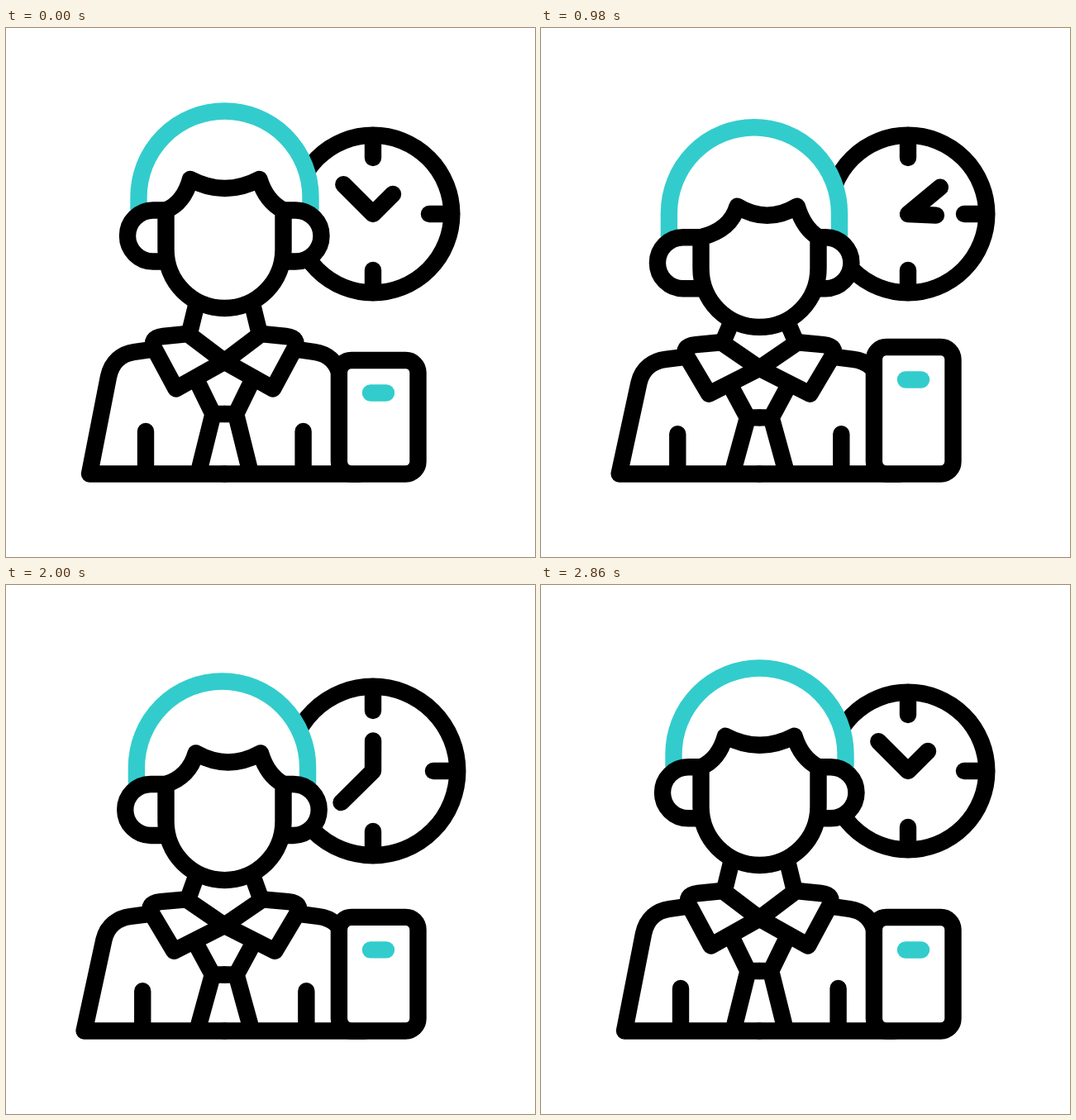
These frames come from a looping animation (640x640 px, 3160 ms). An HTML page with a canvas:

```html
<!DOCTYPE html>
<html>
<head>
<meta charset="utf-8">
<style>
html, body { margin: 0; width: 100%; height: 100%; overflow: hidden; background: #fff; }
canvas { display: block; width: 640px; height: 640px; }
</style>
</head>
<body>
<canvas width="640" height="640"></canvas>
<script>
const ctx = document.querySelector('canvas').getContext('2d');
const LOOP = 3160, MID = 264.3, FLOOR = 539.5, TEAL = '#33cccc';
const BEATS = [200, 440, 960, 1740, 2015, 2330, 2860];

const portion = (t, from, to) => Math.min(1, Math.max(0, (t - from) / (to - from)));

function ease(t, from, to) {
  const x = portion(t, from, to);
  return x * x * (3 - 2 * x);
}

// Swings from rest through one peak per beat and back to rest
function bounce(t, ...peaks) {
  let last = 0, sum = 0;
  [...peaks, 0].forEach((peak, i) => {
    sum += (peak - last) * ease(t, BEATS[i], BEATS[i + 1]);
    last = peak;
  });
  return sum;
}

// Vertical shift of a part of the head
function nod(t, up, down) {
  const b = bounce(t, -1, 1, -1, .8, -.5);
  return b * (b < 0 ? up : down);
}

const chinDy = t => nod(t, 15, 23);
const hairDy = t => nod(t + 20, 18.5, 20);
const earDy = t => nod(t - 40, 27, 33);
const turn = t => ease(t, 660, 1040) - ease(t, 1760, 2200);
const clockGrow = t => 10 * (ease(t, 1100, 1600) - ease(t, 1840, 2280))
  + 4.5 * Math.sin(Math.PI * portion(t, 2280, 2860)) ** 2;
const boxDy = t => 16 * Math.sin(2 * Math.PI * (t - 350) / 840)
  * (ease(t, 200, 900) - ease(t, 1400, 2060));

function spin(t) {
  const x = portion(t, 82, 2882);
  return x < .5 ? 4 * x ** 3 : 1 - 4 * (1 - x) ** 3;
}

function paint(path, color = '#000', filled) {
  ctx.beginPath();
  path();
  if (filled) { ctx.fillStyle = '#fff'; ctx.fill(); }
  ctx.strokeStyle = color;
  ctx.stroke();
}

function line(...p) {
  ctx.moveTo(p[0], p[1]);
  for (let i = 2; i < p.length; i += 2) ctx.lineTo(p[i], p[i + 1]);
}

function drawClock(t) {
  const k = 1 + clockGrow(t) / 95.3, p = spin(t);
  const at = (deg, r) => {
    const a = deg * Math.PI / 180;
    return [444 + r * k * Math.sin(a), 225 - r * k * Math.cos(a)];
  };
  paint(() => ctx.arc(444, 225, 95.3 * k, 0, 7));
  paint(() => {
    for (const a of [0, 90, 180]) line(...at(a, 68), ...at(a, 95));
    line(...at(-45 + 720 * p, 50.5), 444, 225, ...at(45 + 360 * p, 34));
  });
}

function drawBody(t) {
  const b = bounce(t + 30, -1, 1, -1, 1, -1);
  const sx = 1 + .04 * b, sy = 1 - .062 * b, chin = chinDy(t);
  for (const side of [1, -1]) {
    const P = (...p) => p.map((v, i) => i % 2
      ? FLOOR + (v - FLOOR) * sy
      : MID + side * (v - MID) * sx);
    paint(() => {
      line(...P(MID, FLOOR, 101, FLOOR, 124, 422));
      ctx.bezierCurveTo(...P(128, 403, 141, 394, 155, 392));
      ctx.lineTo(...P(176, 389));
      line(...P(169, 488, 169, FLOOR));
      line(...P(231.5, 428, 250.5, 467, 232.5, FLOOR));
      line(...P(250.5, 467, MID, 467));
      line(...P(222, 369), MID - side * 33, 331 + chin);
    });
    paint(() => {
      line(...P(220, 370, 190, 373));
      ctx.quadraticCurveTo(...P(173, 375, 180, 389));
      ctx.lineTo(...P(205.5, 436.5));
      ctx.lineTo(...P(MID, 403.5));
      ctx.closePath();
    }, '#000', true);
  }
}

function drawHead(t) {
  const u = turn(t), top = 100.5 + hairDy(t), ear = 220.5 + earDy(t), jaw = 268 + chinDy(t);
  const rx = 104 - u, ry = Math.min(104, ear - top), hx = 264.5 - 7 * u;
  const l = 193.5, r = 335.5, shift = -6.5 * u, peak = ear - 37.5;
  const pl = 223 + 15.5 * u, pr = 306.5 + 3.5 * u;

  ctx.lineCap = 'butt';
  paint(() => {
    ctx.moveTo(hx - rx, ear);
    ctx.ellipse(hx, top + ry, rx, ry, 0, Math.PI, 2 * Math.PI);
    ctx.lineTo(hx + rx, ear);
  }, TEAL, true);
  ctx.lineCap = 'round';

  for (const [x, edge, left] of [[178 + shift, l, true], [350.5 + shift, r, false]]) {
    paint(() => {
      ctx.moveTo(edge, ear);
      ctx.arc(x, ear + 31, 31, -Math.PI / 2, Math.PI / 2, left);
      ctx.lineTo(edge, ear + 62);
    }, '#000', true);
  }

  paint(() => {
    ctx.moveTo(l, ear);
    ctx.quadraticCurveTo(pl - 8, ear - 9, pl, peak);
    ctx.quadraticCurveTo((pl + pr) / 2, peak + 22, pr, peak);
    ctx.quadraticCurveTo(pr + 8, ear - 11, r, ear);
    ctx.lineTo(r, jaw);
    ctx.arc(264.5, jaw, 71, 0, Math.PI);
    ctx.closePath();
  }, '#000', true);
}

function drawBox(t) {
  const dy = boxDy(t), w = Math.max(0, dy) * .25;
  const half = 47.8 + w, bar = 9.5 + .8 * w, top = 402 + dy;
  paint(() => ctx.roundRect(450.7 - half, top, 2 * half, FLOOR - top, 15), '#000', true);
  paint(() => line(450.5 - bar, top + 39.5, 450.5 + bar, top + 39.5), TEAL);
}

function frame(now) {
  const t = now % LOOP;
  ctx.fillStyle = '#fff';
  ctx.fillRect(0, 0, 640, 640);
  ctx.lineWidth = 20.4;
  ctx.lineCap = ctx.lineJoin = 'round';
  drawClock(t);
  drawBody(t);
  drawHead(t);
  drawBox(t);
  requestAnimationFrame(frame);
}
frame(0);
</script>
</body>
</html>
```
